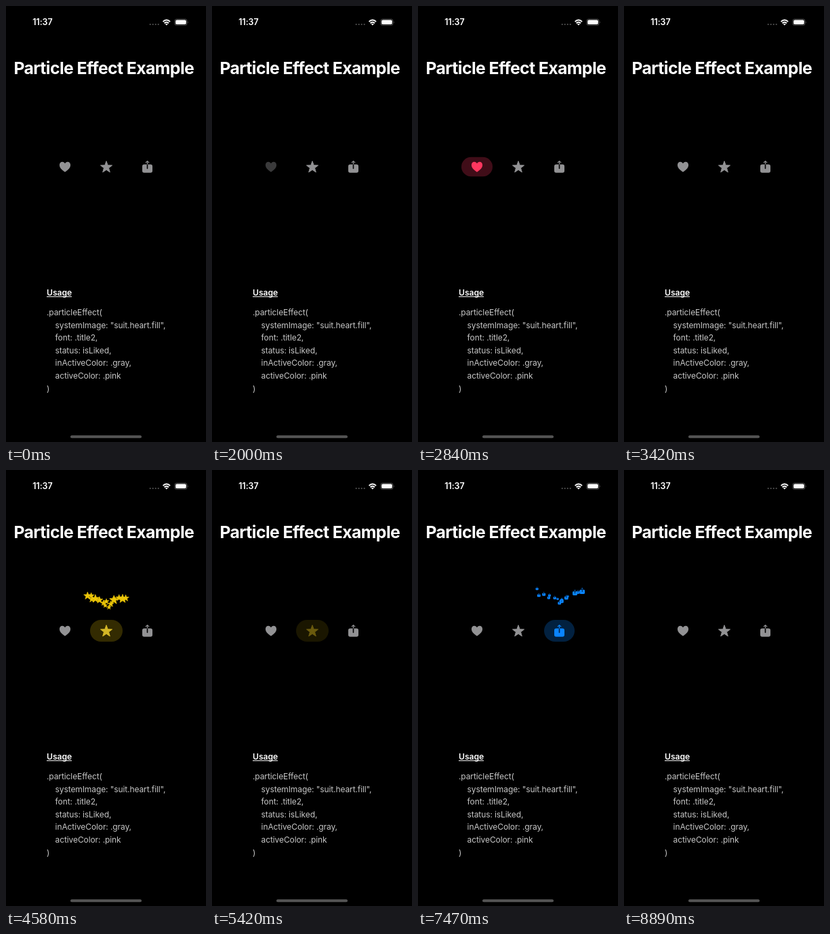
Recreate the animation shown at these times as an HTML page. Size 295 by 640 pixels, loop 9.75 s.

```html
<!DOCTYPE html>
<html lang="en">
<head>
<meta charset="utf-8">
<title>Particle Effect Example</title>
<style>
  html, body { margin: 0; width: 100%; height: 100%; overflow: hidden; background: #000; }
  svg { display: block; width: 100vw; height: 100vh; }
  text { font-family: Inter, "Liberation Sans", sans-serif; fill: #fff; }
  .title { font-size: 24.8px; font-weight: 700; letter-spacing: -.6px; text-anchor: middle; }
  .clock { font-size: 12.5px; font-weight: 600; letter-spacing: -.1px; }
  .usage { font-size: 12.2px; font-weight: 600; letter-spacing: -.05px; }
  .code text { font-size: 12px; letter-spacing: -.1px; fill: #c6c6c6; }
</style>
</head>
<body>
<svg id="stage" viewBox="0 0 295 640" xmlns="http://www.w3.org/2000/svg">
  <defs>
    <path id="heart" stroke="none" d="M0 7.8C-2.6 6.2-8.1 2.4-8.1-2.4C-8.1-5.3-6.2-7.2-3.9-7.2C-2.1-7.2-.8-6.3 0-4.8C.8-6.3 2.1-7.2 3.9-7.2C6.2-7.2 8.1-5.3 8.1-2.4C8.1 2.4 2.6 6.2 0 7.8Z"/>
    <path id="star" stroke-width="1" stroke-linejoin="round"/>
    <g id="share">
      <path stroke="none" d="M-.8-3.4V2.4A.8 .8 0 0 0 .8 2.4V-3.4H4.7Q7.5-3.4 7.5-.6V6Q7.5 8.8 4.7 8.8H-4.7Q-7.5 8.8-7.5 6V-.6Q-7.5-3.4-4.7-3.4Z"/>
      <path fill="none" stroke-width="1.2" stroke-linejoin="round" d="M0-3.4V-8.2M-2.6-5.8L0-8.4L2.6-5.8"/>
    </g>
  </defs>

  <text class="clock" x="39.3" y="28.2">11:37</text>
  <g fill="#555">
    <circle cx="212.7" cy="27" r="1.1"/><circle cx="216.7" cy="27" r="1.1"/>
    <circle cx="220.7" cy="27" r="1.1"/><circle cx="224.7" cy="27" r="1.1"/>
  </g>
  <g fill="none" stroke="#fff" stroke-width="2">
    <path d="M231.6 22.9Q236.8 18 242 22.9"/>
    <path d="M233.6 25.3Q236.8 22.2 240 25.3"/>
    <path fill="#fff" stroke="none" d="M236.8 28.5L234.8 26.5Q236.8 24.9 238.8 26.5Z"/>
  </g>
  <rect x="248.8" y="19.3" width="18.2" height="9" rx="2.8" fill="none" stroke="#666" stroke-width=".8"/>
  <rect x="250.1" y="20.5" width="15.6" height="6.6" rx="1.8" fill="#fff"/>
  <path d="M268.1 22.4Q269.5 23.8 268.1 25.2Z" fill="#666"/>

  <text class="title" x="144.3" y="100">Particle Effect Example</text>

  <text class="usage" x="60" y="425">Usage</text>
  <rect x="60" y="426.2" width="37" height="1" fill="#fff"/>
  <g class="code" id="code"></g>
  <rect x="95" y="630.2" width="105" height="4" rx="2" fill="#545454"/>
</svg>

<script>
const LOOP = 9750, STEP = 109, RELEASE = 70, DIM = 0.4, GRAY = [146, 146, 148];
const stage = document.getElementById('stage');

function add(parent, tag, attrs = {}) {
  const el = document.createElementNS(stage.namespaceURI, tag);
  for (const k in attrs) el.setAttribute(k, attrs[k]);
  return parent.appendChild(el);
}

const lines = ['.particleEffect(', 'systemImage: "suit.heart.fill",', 'font: .title2,',
  'status: isLiked,', 'inActiveColor: .gray,', 'activeColor: .pink', ')'];
lines.forEach((line, i) => {
  const x = i % 6 ? 72.6 : 60;
  add(document.getElementById('code'), 'text', { x, y: 454 + i * 18.6 }).textContent = line;
});

const corners = Array.from({ length: 10 }, (_, i) => {
  const a = (i / 5 - 0.5) * Math.PI, r = i % 2 ? 3.7 : 9;
  return (r * Math.cos(a)).toFixed(2) + ' ' + (r * Math.sin(a) + 0.7).toFixed(2);
});
document.getElementById('star').setAttribute('d', 'M' + corners.join('L') + 'Z');

// Two wings that rise from the middle outwards, with some jitter.
function wings(seed) {
  const rnd = () => (seed = (seed * 16807) % 2147483647) / 2147483647;
  return Array.from({ length: 15 }, (_, i) => {
    const left = i < 8, k = (left ? i : i - 7.5) / 15;
    return {
      x: (left ? -1 : 1) * (k * 75 - rnd() * 6),
      y: -(k * 30 + 38 + rnd() * 8),
      scale: 0.35 + rnd() * 0.5
    };
  });
}

// on: press; off: second press; fade..end in n held steps.
const buttons = [
  { icon: 'heart', x: 87, w: 46, h: 28.5, color: [255, 55, 95], seed: 4100,
    on: 2000, off: 3070, fade: 3070, end: 3420, n: 3 },
  { icon: 'star', x: 148, w: 48, h: 32, color: [255, 214, 10], seed: 90210,
    on: 4250, off: 5300, fade: 5300, end: 5960, n: 6 },
  { icon: 'share', x: 208.5, w: 45, h: 32, color: [10, 132, 255], seed: 77003,
    on: 6920, off: 8340, fade: 8437, end: 8890, n: 4 }
];

const rgb = c => `rgb(${c.map(Math.round)})`;
const clamp = v => Math.min(1, Math.max(0, v));
const smooth = v => (v = clamp(v), v * v * (3 - 2 * v));
const mix = (a, b, p) => a + (b - a) * p;

// Spring from 0 to 1: response 0.6 s, damping 0.7.
function spring(ms) {
  if (ms <= 0) return 0;
  const z = 0.7, d = Math.sqrt(1 - z * z), a = ms / 1000 * 2 * Math.PI / 0.6;
  return 1 - Math.exp(-z * a) * (Math.cos(d * a) + z / d * Math.sin(d * a));
}

for (const b of buttons) {
  const href = '#' + b.icon, color = rgb(b.color);
  b.bits = wings(b.seed);
  b.g = add(stage, 'g', { transform: `translate(${b.x} 236)` });
  b.pill = add(b.g, 'rect', { x: -b.w / 2, y: -b.h / 2, width: b.w, height: b.h, rx: b.h / 2, fill: color });
  b.main = add(b.g, 'use', { href });
  b.swarm = add(b.g, 'g', { fill: color, stroke: color });
  for (const bit of b.bits) bit.el = add(b.swarm, 'use', { href });
}

function drawSwarm(b, ms) {
  const move = spring(ms), grow = smooth(ms / 300);
  b.bits.forEach(({ x, y, scale, el }, i) => {
    const size = scale * (grow - spring(ms - 300 - i * 5));
    const shown = ms < 720 && size > 0.03;
    el.setAttribute('transform', `translate(${x * move} ${y * move}) scale(${shown ? size : 0})`);
  });
}

function drawButton(b, t) {
  let active = 0, alpha = 1, ms = 0;
  if (t >= b.on && t < b.off) {
    ms = Math.floor((t - b.on) / STEP) * STEP - RELEASE;
    active = smooth(ms / 330);
    alpha = mix(DIM, 1, active);
  } else if (t >= b.off && t < b.end) {
    const p = smooth(Math.floor((t - b.fade) / (b.end - b.fade) * b.n) / b.n);
    active = 1 - p;
    alpha = mix(DIM, 1, p);
  }
  const color = rgb(GRAY.map((v, i) => mix(v, b.color[i], active ** 2)));
  b.g.setAttribute('opacity', alpha);
  b.pill.setAttribute('opacity', active * 0.25);
  b.main.setAttribute('fill', color);
  b.main.setAttribute('stroke', color);
  drawSwarm(b, ms);
}

const start = performance.now();
function frame() {
  const t = (performance.now() - start) % LOOP;
  buttons.forEach(b => drawButton(b, t));
  requestAnimationFrame(frame);
}
frame();
</script>
</body>
</html>
```
